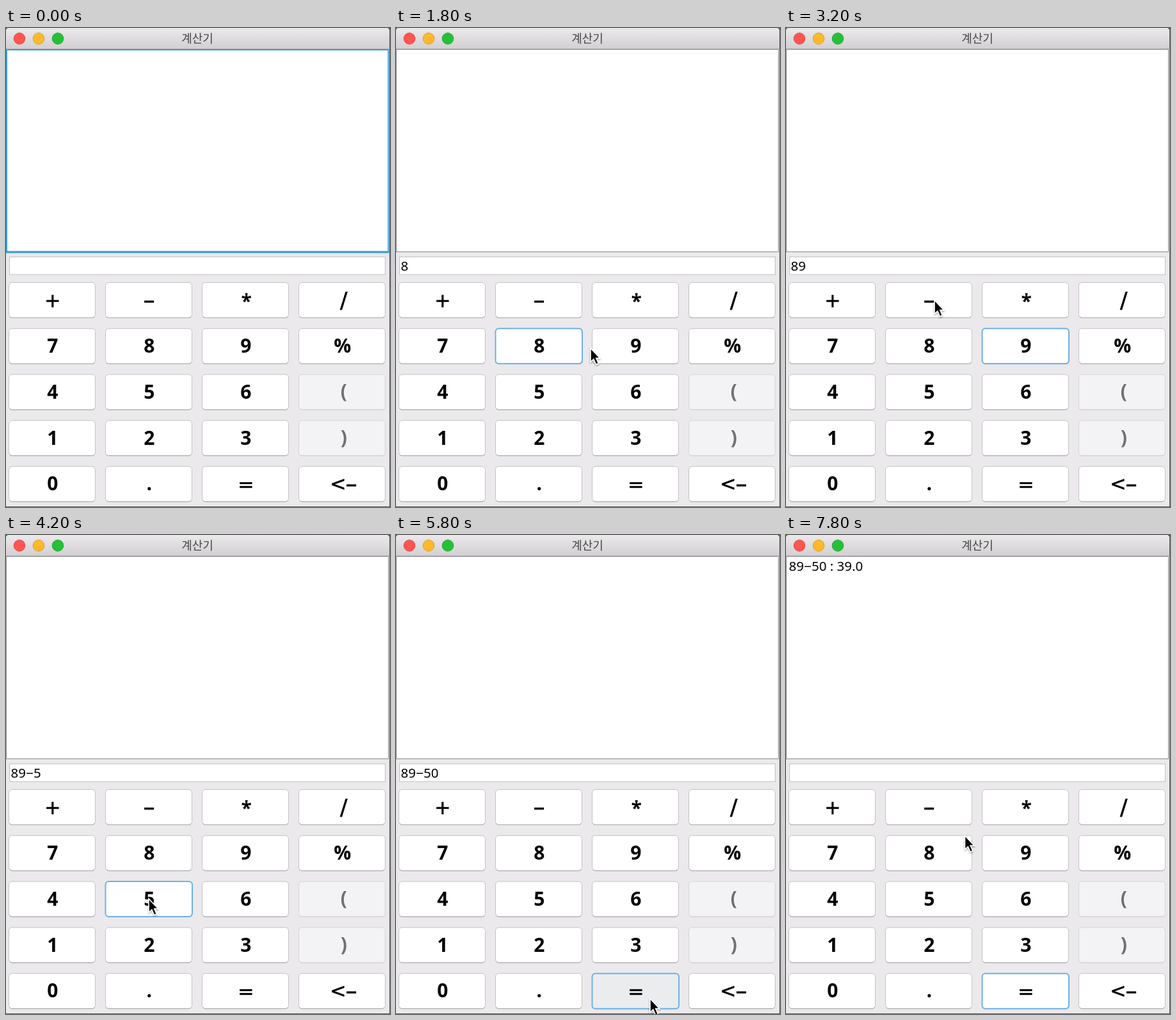
An HTML page that plays this animation: 600 px wide and 748 px high, repeating every 8000 ms.

```html
<!DOCTYPE html>
<html lang="ko">
<head>
<meta charset="utf-8">
<title>계산기</title>
<style>
  html, body { margin: 0; width: 100%; height: 100%; overflow: hidden; background: #5c5c5c; }
  svg { display: block; }
  text { font-family: "Noto Sans", sans-serif; white-space: pre; }
  .title { font: 18px "Noto Sans CJK KR", "Noto Sans CJK", sans-serif; fill: #474747; text-anchor: middle; }
  .entry { font-size: 20.5px; }
  .label { font-size: 30px; font-weight: bold; text-anchor: middle; }
  .sign { font: 30px "DejaVu Sans", sans-serif; stroke: #000; stroke-width: .6; }
  .key { fill: #fff; stroke: #c3c2c4; }
  .pressed .key { fill: #ebeced; }
  .off .key { fill: #f3f2f4; stroke: #d6d5d7; }
  .off text { fill: #707070; }
  .lip { fill: none; stroke: #a9a8aa; }
  .off .lip { stroke: #d0cfd1; }
  .ring { fill: none; stroke: #6cb2e6; stroke-width: 2; visibility: hidden; }
  .focused .ring { visibility: visible; }
</style>
</head>
<body>
<svg width="600" height="748" viewBox="0 0 600 748">
  <defs>
    <linearGradient id="bar" x2="0" y2="1">
      <stop stop-color="#ebe9eb"/><stop offset="1" stop-color="#d1cfd1"/>
    </linearGradient>
    <filter id="shadow" x="-50%" y="-50%" width="200%" height="200%">
      <feDropShadow dx="0" dy="1.5" stdDeviation="1.2" flood-opacity=".4"/>
    </filter>
  </defs>
  <path d="M0 747V5Q0 0 5 0H594Q599 0 599 5V747Z" fill="#ebe9eb"/>
  <path d="M0 33V5Q0 0 5 0H594Q599 0 599 5V33Z" fill="url(#bar)"/>
  <path d="M0 32.5H599" stroke="#b4b2b4"/>
  <g id="lights"></g>
  <text class="title" x="299" y="23">계산기</text>
  <rect x=".5" y="33.5" width="597" height="316" fill="#fff" stroke="#8b8b8b"/>
  <g id="areaFocus" fill="none" stroke="#3d9edb">
    <rect x="1" y="34" width="596.5" height="315.5" stroke-width="2"/>
    <path d="M0 350H598.5" stroke-width="3"/>
  </g>
  <text class="entry" id="result" x="4.5" y="56"></text>
  <rect x="5.5" y="357.5" width="587" height="27.5" fill="#fff" stroke="#c2c1c3"/>
  <text class="entry" id="field" x="7.5" y="379"></text>
  <g id="keys"></g>
  <path id="cursor" d="M1 1V22.5L5.8 18L9.6 26.5L13.4 24.8L9.7 16.6H15.8Z"
        stroke="#fff" stroke-width="1.6" filter="url(#shadow)"/>
</svg>
<script>
const STEP = 200, LOOP = 8000;
const $ = id => document.getElementById(id);

$("lights").innerHTML = [["#ff5650", "#df4843"], ["#ffb92b", "#dd9d27"], ["#24c138", "#1fa62c"]]
  .map(([fill, edge], i) => `<circle cx="${21 + 30 * i}" cy="16.5" r="8.8" fill="${fill}" stroke="${edge}"/>`)
  .join("");

const names = ["+", "−", "*", "/", "7", "8", "9", "%", "4", "5", "6", "(", "1", "2", "3", ")", "0", ".", "=", "<−"];

function label(name, x, y) {
  const text = (s, dx = 0, dy = 0, cls = "label") =>
    `<text class="${cls}" x="${x + dx}" y="${y + dy}">${s}</text>`;
  const sign = (s, dx, dy) => text(s, dx, dy, "label sign");
  switch (name) {
    case "+": case "=": return sign(name, 0, .8);
    case "/": return `<text class="label sign" style="font-size:34px" x="${x + 2}" y="${y + 2}">/</text>`;
    case "<−": return sign("&lt;", -7, 0) + text("−", 14, 1.5);
    case "−": return text(name, 0, 1.5);
    case "*": return text(name, 1, 2);
    case "(": case ")": return text(name, 2, -1);
    default: return text(name);
  }
}

$("keys").innerHTML = names.map((name, i) => {
  const x = 4.5 + 151 * (i % 4), y = 397.5 + 71.8 * (i >> 2);
  const off = name === "(" || name === ")" ? "off" : "";
  return `<g class="${off}">
    <rect class="key" x="${x}" y="${y}" width="135" height="55" rx="5"/>
    <path class="lip" d="M${x + 1} ${y + 52.5}Q${x + 2} ${y + 55} ${x + 5} ${y + 55}h125q3 0 4 -2.5"/>
    <rect class="ring" x="${x}" y="${y}" width="135.5" height="55" rx="5"/>
    ${label(name, x + 68.3, Math.round(y + 37.7))}</g>`;
}).join("");
const keys = [...$("keys").children];

// Pointer waypoints: time, x, y
const path = [
  [600, 470, 6], [1000, 275, 420], [1200, 232, 497], [1600, 232, 497],
  [1800, 303, 499], [2000, 370, 502], [2600, 370, 502], [2800, 362, 494],
  [3200, 231, 424], [3600, 231, 426], [4000, 222, 567], [4200, 222, 567],
  [4600, 100, 690], [4800, 88, 708], [5000, 88, 708], [5200, 282, 710],
  [5600, 396, 723], [6000, 396, 723], [6400, 419, 709], [7000, 385, 600],
  [7600, 304, 460], [7800, 278.5, 468.5]
];

// Each key goes down at its time and acts one step later
const presses = [[1200, "8"], [2200, "9"], [3400, "−"], [4000, "5"], [4800, "0"], [5800, "="]];

function pointerAt(t) {
  const next = path.findIndex(p => p[0] > t);
  if (next < 0) return path[path.length - 1].slice(1);
  const [t0, x0, y0] = path[next - 1], [t1, x1, y1] = path[next];
  const k = (t - t0) / (t1 - t0);
  return [x0 + (x1 - x0) * k, y0 + (y1 - y0) * k];
}

function draw(time) {
  const t = Math.floor(time % LOOP / STEP) * STEP;
  const down = presses.filter(p => t >= p[0]);
  const typed = presses.filter(p => t >= p[0] + STEP).map(p => p[1]).join("");
  const done = typed.endsWith("=");
  const [pressTime, active] = down[down.length - 1] || [];

  $("areaFocus").style.display = active ? "none" : "";
  $("field").textContent = done ? "" : typed;
  $("result").textContent = done ? typed.slice(0, -1) + " : 39.0" : "";
  keys.forEach((key, i) => {
    const focused = names[i] === active;
    key.classList.toggle("focused", focused);
    key.classList.toggle("pressed", focused && t < pressTime + STEP);
  });

  const shown = t >= path[0][0];
  $("cursor").style.display = shown ? "" : "none";
  if (shown) $("cursor").setAttribute("transform", `translate(${pointerAt(t)})`);
}

const start = performance.now();
function tick() {
  draw(performance.now() - start);
  requestAnimationFrame(tick);
}
tick();
</script>
</body>
</html>
```
